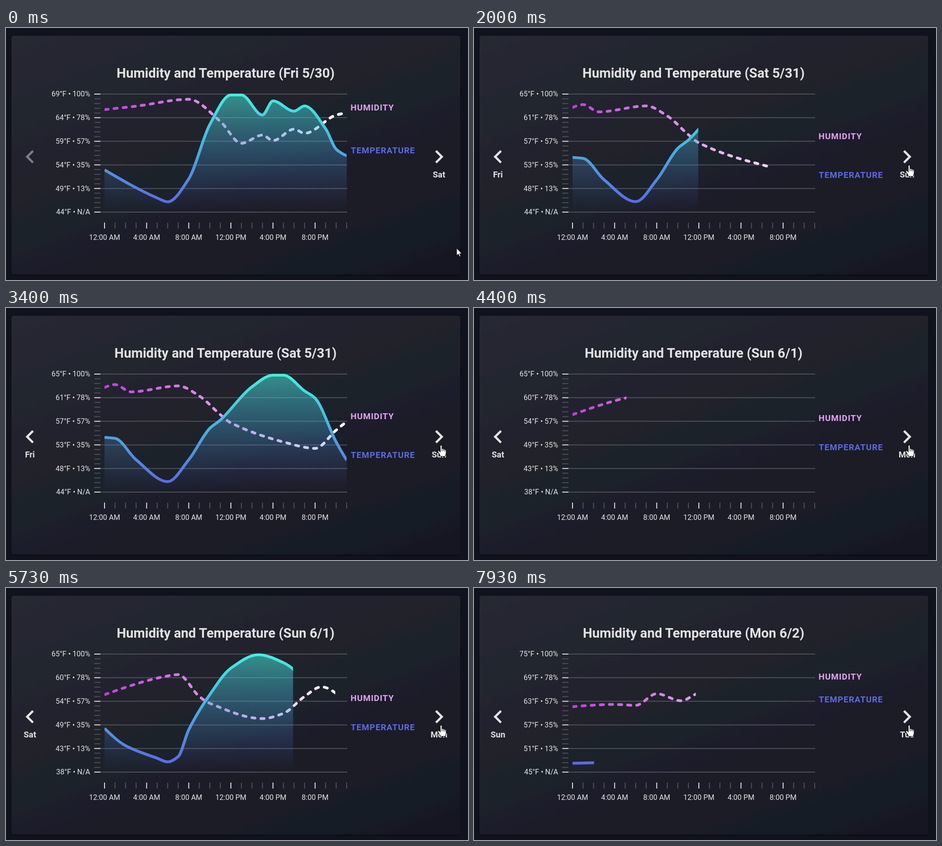
Write an HTML page that moves like this. It is 1013 px wide and 553 px high and loops after 8 s.

```html
<!DOCTYPE html>
<html lang="en">
<head>
<meta charset="utf-8">
<title>Humidity and Temperature</title>
<style>
  html, body { margin: 0; width: 100%; height: 100%; overflow: hidden; background: #10131d; }
  svg { display: block; width: 100%; height: 100%; }
  text { font-family: Roboto, sans-serif; font-size: 16px; fill: #e6e6e6; }
  .title { font-size: 29.1px; font-weight: 700; fill: #e2e2e4; }
  .nav { font-size: 18.4px; font-weight: 700; fill: #e2e2e4; }
  .series { font-size: 18.6px; font-weight: 700; letter-spacing: 1px; }
  .mid { text-anchor: middle; }
  .end { text-anchor: end; }
</style>
</head>
<body>
<svg viewBox="0 0 1013 553">
  <defs>
    <linearGradient id="card" gradientUnits="userSpaceOnUse" x1="362" y1="-110" x2="646" y2="668">
      <stop offset="0" stop-color="#272932"/>
      <stop offset="1" stop-color="#161823"/>
    </linearGradient>
    <linearGradient id="tempLine" gradientUnits="userSpaceOnUse" x1="0" y1="145" x2="0" y2="385">
      <stop offset="0" stop-color="#42f0e0"/>
      <stop offset=".55" stop-color="#4aa8e0"/>
      <stop offset="1" stop-color="#5c6be4"/>
    </linearGradient>
    <linearGradient id="tempFill" gradientUnits="userSpaceOnUse" x1="0" y1="145" x2="0" y2="404">
      <stop offset="0" stop-color="#42f0e0" stop-opacity=".54"/>
      <stop offset=".5" stop-color="#4aa8e0" stop-opacity=".3"/>
      <stop offset="1" stop-color="#5c6be4" stop-opacity="0"/>
    </linearGradient>
    <linearGradient id="humLine" gradientUnits="userSpaceOnUse" x1="216" y1="0" x2="747" y2="0">
      <stop offset="0" stop-color="#c03fdc"/>
      <stop offset="1" stop-color="#fff"/>
    </linearGradient>
    <filter id="shadow" x="-5%" y="-5%" width="110%" height="110%">
      <feDropShadow dx="0" dy="2" stdDeviation="2" flood-color="#000" flood-opacity=".35"/>
    </filter>
    <clipPath id="humClip"><rect id="humRect" x="216" y="135" height="280"/></clipPath>
    <clipPath id="tempClip"><rect id="tempRect" x="216" y="135" height="280"/></clipPath>
  </defs>

  <rect width="1013" height="553" fill="#10131d"/>
  <rect x="12" y="17" width="984" height="524" rx="5" fill="url(#card)" filter="url(#shadow)"/>
  <g id="axes" stroke-width="2"></g>
  <text id="title" class="title mid" x="481.5" y="108.5"></text>

  <path id="hum" clip-path="url(#humClip)" fill="none" stroke="url(#humLine)" stroke-width="6"
        stroke-linecap="round" stroke-dasharray="7 13" stroke-dashoffset="-1"/>
  <g clip-path="url(#tempClip)">
    <path id="area" fill="url(#tempFill)"/>
    <path id="temp" fill="none" stroke="url(#tempLine)" stroke-width="6.2"/>
  </g>
  <text id="humLabel" class="series" x="755.5" style="fill:#e7a3f5">HUMIDITY</text>
  <text id="tempLabel" class="series" x="756" style="fill:#5b6be8">TEMPERATURE</text>

  <path id="prevIcon" transform="translate(23.6 253.5) scale(2.42)"
        d="M15.41 7.41 14 6l-6 6 6 6 1.41-1.41L10.83 12z"/>
  <path fill="#e4e4e6" transform="translate(920.3 253.5) scale(2.42)"
        d="M10 6 8.59 7.41 13.17 12l-4.58 4.59L10 18l6-6z"/>
  <text id="prev" class="nav mid" x="52.5" y="328"></text>
  <text id="next" class="nav mid" x="949.5" y="328"></text>

  <path id="arrow" fill="#fff" stroke="#000" stroke-linejoin="round"
        d="M0 0V16.5L3.8 13 6.5 19 9 18 6.4 12.2H11.5Z"/>
  <g id="hand" stroke="#000" stroke-linejoin="round" stroke-linecap="round">
    <path fill="#fff" d="M-1.9 1.8C-1.9-.4 1.9-.4 1.9 1.8V8C3 6.6 5 7.2 5.2 9 6.3 8 8 8.6 8.2 10
      9.6 9.4 11 10.2 11 12V17C11 19.5 9.4 20.5 9.2 24.5H-1.6C-1.8 21-4.6 18.6-6.8 14.6-7.8 12.6-5.4 11.2-3.8 13L-1.9 15Z"/>
    <path fill="none" d="M1.9 8V13M5.2 9V13M8.2 10V13.5"/>
  </g>
</svg>

<script>
const LOOP = 8000, DRAW = 2000, LAG = 508;
const X0 = 216, X1 = 747, HOUR = (X1 - X0) / 23, TOP = 145, BASE = 404;
const $ = id => document.getElementById(id);
const set = (id, attrs) => { for (const k in attrs) $(id).setAttribute(k, attrs[k]); };

// at: chart switches; start: humidity begins to draw; hum, temp: turning points as [hour, y]
const days = [
  { at: 0, start: -LOOP, name: 'Fri', date: '5/30', range: [69, 44],
    hum: [[0, 179], [3, 171.5], [8, 156.5], [11, 205], [13, 253], [15, 235], [16, 247],
      [18, 222], [19, 231], [22, 191], [23, 186.5]],
    temp: [[0, 311.5], [5, 373], [6, 381.5], [8, 331], [10, 212], [12, 147], [13, 147],
      [15, 191], [16, 160], [18, 182.5], [19, 171], [21, 221], [22, 266], [23, 280.5]] },
  { at: 795, start: 880, name: 'Sat', date: '5/31', range: [65.4, 43.9],
    hum: [[0, 174.5], [1, 168], [2.5, 184], [7, 171], [9, 193], [11, 234], [12, 252],
      [17, 294], [20, 308], [22, 268], [23, 249]],
    temp: [[0, 284], [1, 286], [3, 333], [6, 381], [8, 333], [10, 264], [11, 246],
      [14, 173], [16, 147.5], [17, 147.5], [19, 182], [20, 198], [22, 294], [23, 334]] },
  { at: 4065, start: 4164, name: 'Sun', date: '6/1', range: [65, 38],
    hum: [[0, 234], [6, 193], [7, 190], [9, 238], [10, 253], [15, 286.5], [17, 275],
      [19, 238], [20.6, 217], [23, 253]],
    temp: [[0, 308], [2, 346], [5, 373.5], [6, 381.5], [7, 370], [8, 311], [10, 234],
      [12, 176], [14.6, 146.5], [17, 164], [19, 203], [21, 285], [22, 306], [23, 317]] },
  { at: 7195, start: 7332, name: 'Mon', date: '6/2', range: [75, 45],
    hum: [[0, 260.5], [4, 255.5], [6, 257.5], [8, 232], [10.3, 247.5], [12, 231], [23, 206]],
    temp: [[0, 384.5], [3, 382.5], [23, 256.5]] }
];
const names = ['', ...days.map(d => d.name), 'Tue'];

// Monotone cubic: tangents are harmonic means of the neighbouring slopes
function curve(keys) {
  const pts = keys.map(([h, y]) => [X0 + h * HOUR, y]);
  const n = pts.length - 1;
  const slope = pts.slice(1).map(([x, y], i) => (y - pts[i][1]) / (x - pts[i][0]));
  const m = pts.map((_, i) => {
    const a = slope[i - 1], b = slope[i];
    return a * b > 0 ? 2 * a * b / (a + b) : 0;
  });
  m[0] = (3 * slope[0] - m[1]) / 2;
  m[n] = (3 * slope[n - 1] - m[n - 1]) / 2;
  let d = `M${pts[0]}`;
  for (let i = 0; i < n; i++) {
    const [xa, ya] = pts[i], [xb, yb] = pts[i + 1], w = (xb - xa) / 3;
    d += `C${xa + w} ${ya + m[i] * w} ${xb - w} ${yb - m[i + 1] * w} ${xb} ${yb}`;
  }
  return d;
}

function buildAxes() {
  const dim = '#4e5058', lit = '#e2e2e4';
  const line = (x1, y1, x2, y2, c) => `<path d="M${x1} ${y1}L${x2} ${y2}" stroke="${c}"/>`;
  let out = '';
  for (let i = 0; i <= 25; i++) {
    const y = TOP + (BASE - TOP) * i / 25, major = i % 5 === 0;
    if (major) {
      out += line(207, y, 748, y, dim);
      out += `<text class="scale end" x="184.5" y="${y + 5.3}"></text>`;
    }
    out += line(193.5, y, 207, y, major ? lit : dim);
  }
  for (let h = 0; h < 24; h++) {
    const x = X0 + h * HOUR, major = h % 4 === 0;
    out += line(x, 427, x, 440, major ? lit : dim);
    if (major) out += `<text class="mid" x="${x}" y="464.8">${h % 12 || 12}:00 ${h < 12 ? 'AM' : 'PM'}</text>`;
  }
  $('axes').innerHTML = out;
}

let shown = -1;
function showDay(i) {
  if (i === shown) return;
  shown = i;
  const day = days[i], [high, low] = day.range;
  $('title').textContent = `Humidity and Temperature (${day.name} ${day.date})`;
  document.querySelectorAll('.scale').forEach((el, k) => {
    const pct = Math.round(100 - 21.7 * k);
    el.textContent = `${Math.round(high + (low - high) * k / 5)}°F • ${pct < 0 ? 'N/A' : pct + '%'}`;
  });
  const temp = curve(day.temp), labelY = keys => keys.at(-1)[1] - 5.3;
  set('hum', { d: curve(day.hum) });
  set('temp', { d: temp });
  set('area', { d: `${temp}V${BASE}H${X0}Z` });
  set('humLabel', { y: labelY(day.hum) });
  set('tempLabel', { y: labelY(day.temp) });
  $('prev').textContent = names[i];
  $('next').textContent = names[i + 2];
  set('prevIcon', { fill: i ? '#e4e4e6' : '#7d7e83' });
}

const clamp = u => Math.max(0, Math.min(1, u));
const easeOut = u => 1 - (1 - u) ** 2;
const smooth = u => u * u * (3 - 2 * u);
const reveal = (t, start) => (X1 - X0) * easeOut(clamp((t - start) / DRAW));

// The pointer overshoots the button, then settles; it is a hand while over the button
function moveCursor(t) {
  const a = smooth(clamp((t - 20) / 400)), b = smooth(clamp((t - 420) / 180));
  const x = 988 - 37 * a + 3 * b, y = 483 - 209 * a + 27 * b;
  const over = y < 335, transform = `translate(${x} ${y})`;
  set('arrow', { transform, visibility: over ? 'hidden' : 'visible' });
  set('hand', { transform, visibility: over ? 'visible' : 'hidden' });
}

function render(t) {
  const i = days.filter(d => t >= d.at).length - 1;
  showDay(i);
  set('humRect', { width: reveal(t, days[i].start) });
  set('tempRect', { width: reveal(t, days[i].start + LAG) });
  moveCursor(t);
}

buildAxes();
const begin = performance.now();
(function tick() {
  render((performance.now() - begin) % LOOP);
  requestAnimationFrame(tick);
})();
</script>
</body>
</html>
```
